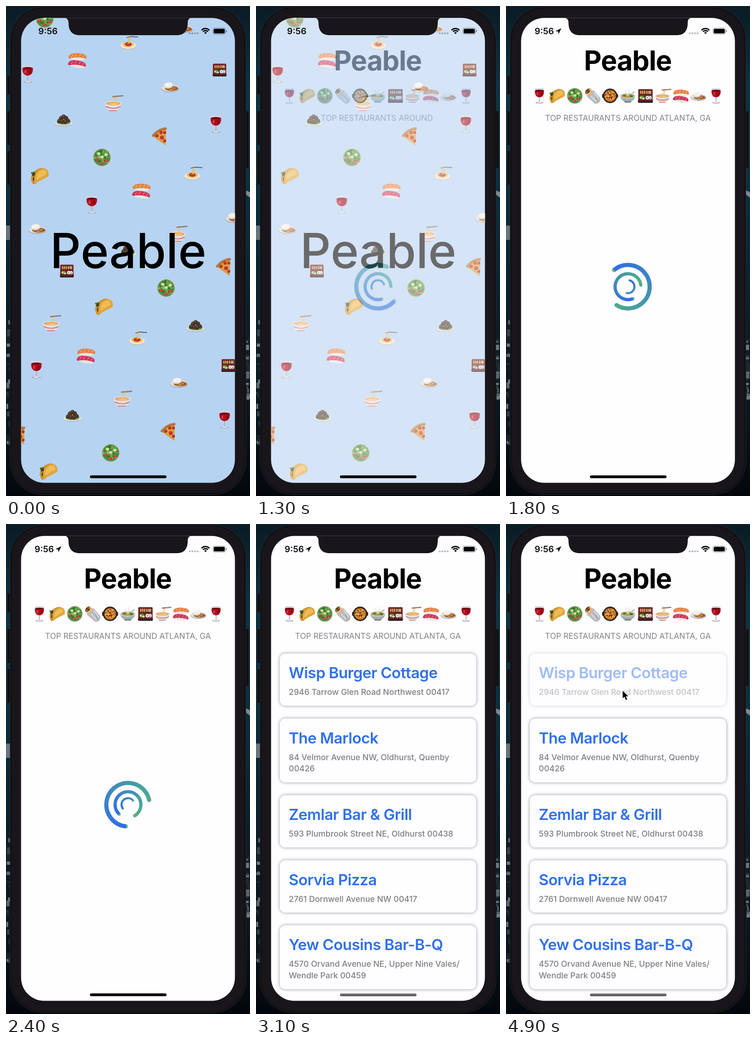
An HTML page with a canvas for the animation above (5 s loop, 529x1058 px).

```html
<!DOCTYPE html>
<html lang="en">
<head>
<meta charset="utf-8">
<title>Restaurant finder</title>
<style>
html, body { margin: 0; width: 100%; height: 100%; overflow: hidden; background: #06131a; }
canvas { display: block; width: 529px; height: 1058px; }
</style>
</head>
<body>
<canvas id="stage" width="529" height="1058"></canvas>
<script>
const W = 529, H = 1058, LOOP = 5000, STEP = 100;
const FONT = 'Inter, "Liberation Sans", sans-serif';
const NAME = 'Peable';
const stage = document.getElementById('stage').getContext('2d');
let c = stage;

const layer = () => {
  const cv = document.createElement('canvas');
  cv.width = W; cv.height = H;
  return cv.getContext('2d');
};
const seeded = s => () => (s = (s * 16807) % 2147483647) / 2147483647;

// drawing helpers
function el(x, y, rx, ry, color, rot = 0) {
  c.fillStyle = color;
  c.beginPath();
  c.ellipse(x, y, rx, ry, rot, 0, 7);
  c.fill();
}
function shape(d, color) {
  c.fillStyle = color;
  c.fill(new Path2D(d));
}
function line(d, color, w) {
  c.strokeStyle = color;
  c.lineWidth = w;
  c.lineCap = c.lineJoin = 'round';
  c.stroke(new Path2D(d));
}
function box(x, y, w, h, r, color) {
  c.fillStyle = color;
  c.beginPath();
  c.roundRect(x, y, w, h, r);
  c.fill();
}
function text(s, x, y, size, weight, color, align = 'left', spacing = 0) {
  c.font = `${weight} ${size}px ${FONT}`;
  c.letterSpacing = spacing + 'px';
  c.textAlign = align;
  c.fillStyle = color;
  c.fillText(s, x, y);
}

// each dish fits a box of about 40 px around 0,0
const dish = {
  wine() {
    shape('M-10.500-19H10.500C13-5 9 4 0 5C-9 4-13-5-10.500-19Z', 'rgba(214,212,222,.9)');
    shape('M-11.300-13H11.300C12-3 8 3 0 3.500C-8 3-12-3-11.300-13Z', '#ad0d1d');
    el(0, -13, 11, 2.2, '#6f0b16');
    el(5, -5, 2, 5, '#7f0a18', .2);
    el(-5, -5, 2, 4, '#dc3542', .2);
    line('M0 5V16', '#b3b3bb', 2.4);
    el(0, 17, 10, 2.2, '#aeb0b8');
    el(0, 16.4, 6, 1.2, '#eef0f4');
  },
  taco() {
    shape('M-14 18C-24 6-18-12 2-17C10-18 14-14 14-12L-8 17Z', '#cf9130');
    const r = seeded(31);
    for (let i = 0; i < 26; i++) {
      const k = r();
      el(-17 + 5 * k + r() * 6, -4 + 17 * k + r() * 4 - 4, 2.3, 2,
        ['#3c6a24', '#37251a', '#81a83c', '#b5402a', '#432d1c'][i % 5], r() * 3);
    }
    shape('M-10 17C-17 0-3-17 10-16C18-15 21-7 19 1C10 6 0 10-10 17Z', '#dda63c');
    shape('M-6 9C-10-2 0-14 9-13C15-12 16-6 14-3C7 0 1 3-6 9Z', '#eebb55');
  },
  salad() {
    el(0, 0, 19.8, 19.8, '#c3cbbb');
    el(0, 0, 18.500, 18.500, '#5c8f48');
    const r = seeded(77);
    for (let i = 0; i < 60; i++) {
      const a = r() * 6.3, d = Math.sqrt(r()) * 16;
      el(d * Math.cos(a), d * Math.sin(a), 3.4, 1.8,
        ['#35702d', '#74a853', '#93bb70', '#437f36'][i % 4], r() * 3);
    }
    for (const [x, y] of [[0, -1], [9, -6], [-7, -8]]) {
      el(x, y, 4.3, 3.6, '#6ea83e');
      el(x, y, 3.5, 2.9, '#cfe0a2');
    }
    for (const [x, y] of [[-11, 4], [10, 7], [0, 12]]) {
      el(x, y, 3.8, 3.1, '#c73d36', .4);
      el(x - 1, y - 1, 1.3, 1, '#e67967');
    }
  },
  sushi() {
    const piece = (base, light, rot) => {
      c.save();
      c.rotate(rot);
      el(0, 5, 17, 4.2, '#ece4e0', .04);
      shape('M-19 2C-18-6-2-8 12-5C18-4 21 1 19 5C8 2-6 2-16 6C-19 6-20 4-19 2Z', base);
      line('M-13 2L-10-2M-5 1L-2-4M4 0L7-4M12 2L14-3', light, 1.5);
      c.restore();
    };
    c.save();
    c.translate(1, -9); piece('#e58243', '#f6b583', .04);
    c.translate(-1, 16); piece('#cf3558', '#ea8197', .12);
    c.restore();
  },
  bento() {
    box(-14.500, -13.500, 29, 25, 2, '#7c2327');
    box(-15, 8, 30, 6, 2, '#2b181a');
    box(-12.500, -11.500, 25, 20, 1, '#4a2421');
    line('M-9.500-9V-5M-5.500-9V-5M-1.500-9V-5', '#e2904f', 3.2);
    line('M3-9V-5M7-9V-5M10-9V-5', '#d8ab74', 2.8);
    line('M-13-1H13M0-1V8', '#8f302c', 1.2);
    el(-7, 3.5, 5, 3.8, '#649447');
    el(-9.500, 3.5, 2.2, 2.2, '#dfcf78');
    el(-4, 5.5, 2.6, 2, '#dcd9c8');
    el(4, 3.8, 3.7, 3.8, '#efece7');
    el(9.500, 3.8, 3.5, 3.8, '#dedad7');
    el(4, 4, 1, 1, '#3b3030');
    el(9.500, 5, 1.1, 1, '#74504c');
    line('M-13 10H13', '#92292b', 1.3);
  },
  ramen() {
    shape('M-19.500 0C-18 10-13 17-2 17C9 17 15 10 16.500 0Z', '#e3dddc');
    line('M-17 7C-8 12 6 12 14 7', '#c96663', 1.7);
    line('M-10 16H6', '#bd6d68', 1.4);
    el(-1.500, 0, 18, 5, '#e9ded4');
    el(-1.500, .5, 15.800, 3.800, '#e3a667');
    line('M-11 1C-6-2 0 3 9 0M-8 2C-2 3 5 3 8 1', '#f0cb84', 1.3);
    line('M1-16C3-8-2-6 0 1M4-16C6-8 2-5 3 1', '#e6c573', 1.6);
    line('M-3-15L20-17M-3-13.500L20-15.500', '#80603e', 1.2);
  },
  curry() {
    el(0, 4, 19.5, 8.5, '#aaa9a8');
    el(0, 3, 19, 7.4, '#e2dfda');
    el(3, 4, 14.500, 5.4, '#a8673a');
    el(8, 3, 2.8, 1.6, '#d8913f');
    el(2, 6.5, 2.8, 1.4, '#cda057');
    el(13, 4, 2, 1.3, '#7b5129');
    el(-3, 7, 2, 1, '#6f8438');
    el(-4, -2, 10.500, 6, '#ded7cc', -.1);
    el(-4, -4, 9, 5, '#f5f1ea', -.1);
  },
  falafel() {
    el(0, 7, 20, 6, '#b9bdbe');
    el(0, 6, 19, 5, '#e4e6e4');
    el(0, 4, 15, 5, '#557a3c');
    for (const [x, y] of [[-9, 1], [9, 1], [-5, -5], [5, -5], [0, -8], [-3, 2], [4, 3]]) {
      el(x, y, 5, 4.7, '#443225');
      el(x - 1, y - 1.5, 2.5, 2, '#674d38');
    }
    el(10, 6, 4, 1.8, '#6c9447', -.4);
  },
  pizza() {
    shape('M-15 0C-9-11 4-17 14-17L13 20Z', '#dd9c44');
    line('M-14-1C-8-10 3-16 13-16.500', '#a86a30', 5);
    line('M-14-2C-8-11 3-17 13-17.500', '#c48a49', 1.8);
    for (const [x, y, r] of [[-6, -1, 3.6], [3, -8, 3.5], [11, -8, 3.2], [5, 3, 4], [11, 10, 3.2]]) {
      el(x, y, r, r, '#b02a22');
      el(x - .6, y - .8, r * .55, r * .5, '#cd4636');
    }
  },
  spaghetti() {
    el(-1, 7, 17.500, 8.500, '#c4b8a9');
    el(-1, 6, 17, 7.7, '#efe6d8');
    el(-1, 4, 12, 6, '#e3b953');
    line('M-11 5C-5 9 5 9 9 4M-9 2C-4-2 5-1 9 3', '#f1d587', 1.2);
    el(-1, 3.5, 7.5, 4.3, '#bb3523');
    el(-2, 2.5, 3, 1.5, '#d8583c');
    line('M-1-13C3-8-3-4 0 1M2-13C4-8 1-4 2 1', '#e6c263', 2);
    line('M-4-11L4-13L20-12', '#5d6068', 1.8);
  },
  burrito() {
    line('M-8-8L10 10', '#dfb37a', 19);
    shape('M2-15L20 6C21 14 14 20 6 19L-14 2C-7 1 0-6 2-15Z', '#b9bcc3');
    line('M4-8L15 7M-3 1L9 13', '#e6e8eb', 2);
    line('M8 2L13 14', '#8f949c', 1.4);
    el(-11, -11, 9.500, 6.500, '#f0cf99', -.78);
    el(-11.500, -11.500, 7.500, 4.7, '#5a3421', -.78);
    el(-14, -9, 2.5, 2, '#6f9f3b');
    el(-10, -13, 2.3, 1.8, '#c3402c');
    el(-7, -15, 1.7, 1.5, '#e8d496');
  },
  paella() {
    line('M-18-3V3M18-3V3', '#2f2925', 4);
    el(0, 0, 18, 18, '#2b2521');
    el(0, 0, 14.500, 14.500, '#c97a2a');
    const r = seeded(9);
    for (let i = 0; i < 36; i++) {
      const a = r() * 6.3, d = Math.sqrt(r()) * 12;
      el(d * Math.cos(a), d * Math.sin(a), 2.4, 1.5,
        ['#efb545', '#c64a25', '#f1d06b', '#8f4a22', '#e58a35', '#43302a'][i % 6], r() * 3);
    }
  },
  soup() {
    line('M-5-15C-8-12-2-10-5-7M3-16C0-13 6-11 3-8', '#dfe3e3', 1.8);
    line('M6-3L16-10', '#a9adb0', 2.4);
    shape('M-19 0C-17 11-10 15 0 15C10 15 17 11 19 0Z', '#a4b0b0');
    shape('M-10 13H10L7 17H-7Z', '#7b8787');
    el(0, 0, 19, 6.5, '#d4dada');
    el(0, 0, 16, 5, '#a99a52');
    for (const [x, y, k] of [[-8, -1, '#4e8433'], [-2, 2, '#d4913e'], [4, -2, '#78a843'],
      [9, 1, '#3f7430'], [0, -3, '#e4d48e']]) el(x, y, 4, 2.3, k, .3);
  }
};
function put(kind, x, y, k = 1) {
  c.save();
  c.translate(x, y);
  c.scale(k, k);
  dish[kind]();
  c.restore();
}

// the wallpaper repeats most dishes at three fixed offsets
const repeats = [[0, 0], [139, 282], [19, 638]];
const triples = {
  wine: [47, 147], taco: [73, 367], salad: [208, 327], sushi: [154, 117], bento: [463, 138],
  ramen: [234, 210], curry: [356, 174], falafel: [125, 247], pizza: [333, 281], spaghetti: [266, 79]
};
const singles = [['salad', 84, 28], ['curry', 386, 46], ['wine', 455, 255], ['wine', 474, 893],
  ['curry', 68, 480], ['bento', 132, 572], ['ramen', 99, 685], ['falafel', 411, 691], ['pizza', 26, 927]];
const menu = ['wine', 'taco', 'salad', 'burrito', 'paella', 'soup', 'bento', 'ramen', 'sushi', 'curry', 'wine'];

function splash() {
  c.fillStyle = '#b7d3f2';
  c.fillRect(0, 0, W, H);
  for (const kind in triples)
    for (const [dx, dy] of repeats) put(kind, triples[kind][0] + dx, triples[kind][1] + dy);
  for (const s of singles) put(...s);
  text(NAME, 265, 566, 104, 550, '#000', 'center');
}

const cards = [
  [279, 'Wisp Burger Cottage', '2946 Tarrow Glen Road Northwest 00417'],
  [419.5, 'The Marlock', '84 Velmor Avenue NW, Oldhurst, Quenby', '00426'],
  [585, 'Zemlar Bar & Grill', '593 Plumbrook Street NE, Oldhurst 00438'],
  [725.5, 'Sorvia Pizza', '2761 Dornwell Avenue NW 00417'],
  [866, 'Yew Cousins Bar-B-Q', '4570 Orvand Avenue NE, Upper Nine Vales/', 'Wendle Park 00459']
];
function card([y, title, ...address], alpha) {
  c.save();
  c.shadowColor = `rgba(0,0,0,${.42 * alpha})`;
  c.shadowBlur = 7;
  box(51.5, y + .5, 426, address.length > 1 ? 138 : 113, 12, '#fefdff');
  c.shadowColor = 'transparent';
  c.globalAlpha = alpha;
  text(title, 71, y + 54, 33, 600, '#2f70ec', 'left', -.5);
  address.forEach((s, i) => text(s, 71, y + 90 + i * 24.5, 17.7, 550, '#7f7f82'));
  c.restore();
}

// ring: radius, width, sweep, angle at 1800 ms, degrees per ms
const rings = [[47, 9, 252, 230, .376], [28, 7, 285, 68, .709], [14, 4.5, 180, 282, .965]];
function spinner(t) {
  for (const [r, w, sweep, from, speed] of rings) {
    c.save();
    c.translate(264.5, 606);
    c.rotate((from + speed * (t - 1800)) * Math.PI / 180);
    const g = c.createConicGradient(0, 0, 0);
    g.addColorStop(0, '#2f6ceb');
    g.addColorStop(.7, '#4dab8c');
    g.addColorStop(1, '#62bb70');
    c.strokeStyle = g;
    c.lineWidth = w;
    c.lineCap = 'round';
    c.beginPath();
    c.arc(0, 0, r, 0, sweep * Math.PI / 180);
    c.stroke();
    c.restore();
  }
}

const LIST_AT = 2800;
function home(t) {
  c.fillStyle = '#fefdff';
  c.fillRect(0, 0, W, H);
  text(NAME, 264, 139, 59, 700, '#000', 'center', -1);
  menu.forEach((kind, i) => put(kind, 72.5 + i * 38.3, 194, kind === 'bento' ? 1.08 : .87));
  const known = t >= 1600;
  text('TOP RESTAURANTS AROUND' + (known ? ' ATLANTA, GA' : ''), known ? 264.5 : 262, 248,
    17.2, 400, '#838387', 'center');
  if (t < LIST_AT) spinner(t);
  else cards.forEach((d, i) => card(d, i === 0 && t >= 4900 ? .46 : 1));
}

function statusBar(t) {
  const k = Math.min(1, Math.max(0, (t - 1200) / 300));
  text('9:56', 70 - 8 * k, 61, 19, 600, '#0b0b0d');
  c.globalAlpha = Math.max(0, k * 2 - 1);
  shape('M120 48L107 54.200L113 55L113.800 61Z', '#0b0b0d');
  c.globalAlpha = 1;
  for (let i = 0; i < 4; i++) el(398.5 + i * 5.6, 59, 2.1, 2.1, 'rgba(0,0,0,.27)');
  c.strokeStyle = '#050507';
  c.lineCap = 'butt';
  for (const [r, w] of [[11.8, 2.7], [7.4, 2.7], [2, 4]]) {
    c.lineWidth = w;
    c.beginPath();
    c.arc(432.5, 60.5, r, -Math.PI * .76, -Math.PI * .24);
    c.stroke();
  }
  c.strokeStyle = 'rgba(0,0,0,.42)';
  c.lineWidth = 1;
  c.beginPath();
  c.roundRect(448.5, 47.5, 27.5, 13.5, 4);
  c.stroke();
  box(450.3, 49.3, 24, 10, 2.5, '#050507');
  box(477, 52, 1.8, 4.5, 1, 'rgba(0,0,0,.45)');
}

function backdrop() {
  const g = c.createLinearGradient(0, 0, 0, H);
  ['#0a1b25', '#0d3342', '#0c3140', '#0b2836', '#0c1c27', '#0a1720', '#03070b']
    .forEach((k, i) => g.addColorStop(i / 6, k));
  c.fillStyle = g;
  c.fillRect(0, 0, W, H);
  c.fillStyle = '#68757c';
  c.fillRect(0, 474, 9, 31);
  shape('M520 398L529 402V414L520 407Z', '#7d898f');
  const r = seeded(123);
  for (let i = 0; i < 44; i++) {
    const right = i % 2, y = right ? 715 + r() * 130 : 678 + r() * 265;
    c.fillStyle = ['#5a666d', '#35434c', '#1b2a33', '#6e7a80', '#14222b'][Math.floor(r() * 5)];
    c.fillRect((right ? 519 : 0) + r() * 5, y, 3 + r() * 6, 4 + r() * 10);
  }
  c.fillStyle = '#25292d';
  c.fillRect(0, 0, W, 1);
}

function phone() {
  backdrop();
  for (const [x, y, h] of [[2, 149, 43], [2, 226, 75], [2, 312, 75], [518, 226, 125]]) {
    box(x, y, 9, h, 3, '#2b2b2e');
    box(x + 1, y + 1, 7, h - 2, 2, '#111114');
  }
  box(8.5, 1.5, 512, 1054, 72, '#2a292c');
  box(9.5, 2.5, 510, 1052, 71, '#0f0e11');
  box(12, 5, 505, 1047, 69, '#18161a');
}

function cursor(t) {
  if (t < 4200) return;
  const k = Math.min(1, (t - 4200) / 500), e = 1 - (1 - k) ** 3;
  c.save();
  c.translate(532 - 279 * e, 560 - 200 * e);
  const d = 'M0 0V16.500L3.800 13L6.800 20L9.800 18.700L6.800 12H12Z';
  line(d, '#fff', 2.2);
  shape(d, '#050505');
  c.restore();
}

const frame = layer(), page = layer();
c = frame;
phone();

const fades = { 1300: .42, 1400: .82 };
function draw(t) {
  const a = t < 1300 ? 0 : fades[t] || 1;
  if (a) { c = page; home(t); }
  c = stage;
  c.drawImage(frame.canvas, 0, 0);
  c.save();
  c.beginPath();
  c.roundRect(32.7, 25.7, 463.6, 1003.8, 50);
  c.clip();
  if (a < 1) splash();
  c.globalAlpha = a;
  if (a) c.drawImage(page.canvas, 0, 0);
  c.globalAlpha = 1;
  statusBar(t);
  shape('M124 24C132 26 135.500 29 135.500 36C135.500 53 143 63 160 63H370C387 63 394 53 394 36C394 29 397 26 405 24Z', '#18161a');
  let bar = '#000';
  if (t >= LIST_AT) {
    bar = c.createLinearGradient(0, 1013, 0, 1020);
    bar.addColorStop(0, '#97979a');
    bar.addColorStop(1, '#38383b');
  }
  box(182, 1013.5, 166, 6, 3, bar);
  c.restore();
  cursor(t);
}

const start = performance.now();
function tick() {
  const t = (performance.now() - start) % LOOP;
  draw(Math.floor(t / STEP) * STEP);
  requestAnimationFrame(tick);
}
tick();
</script>
</body>
</html>
```
